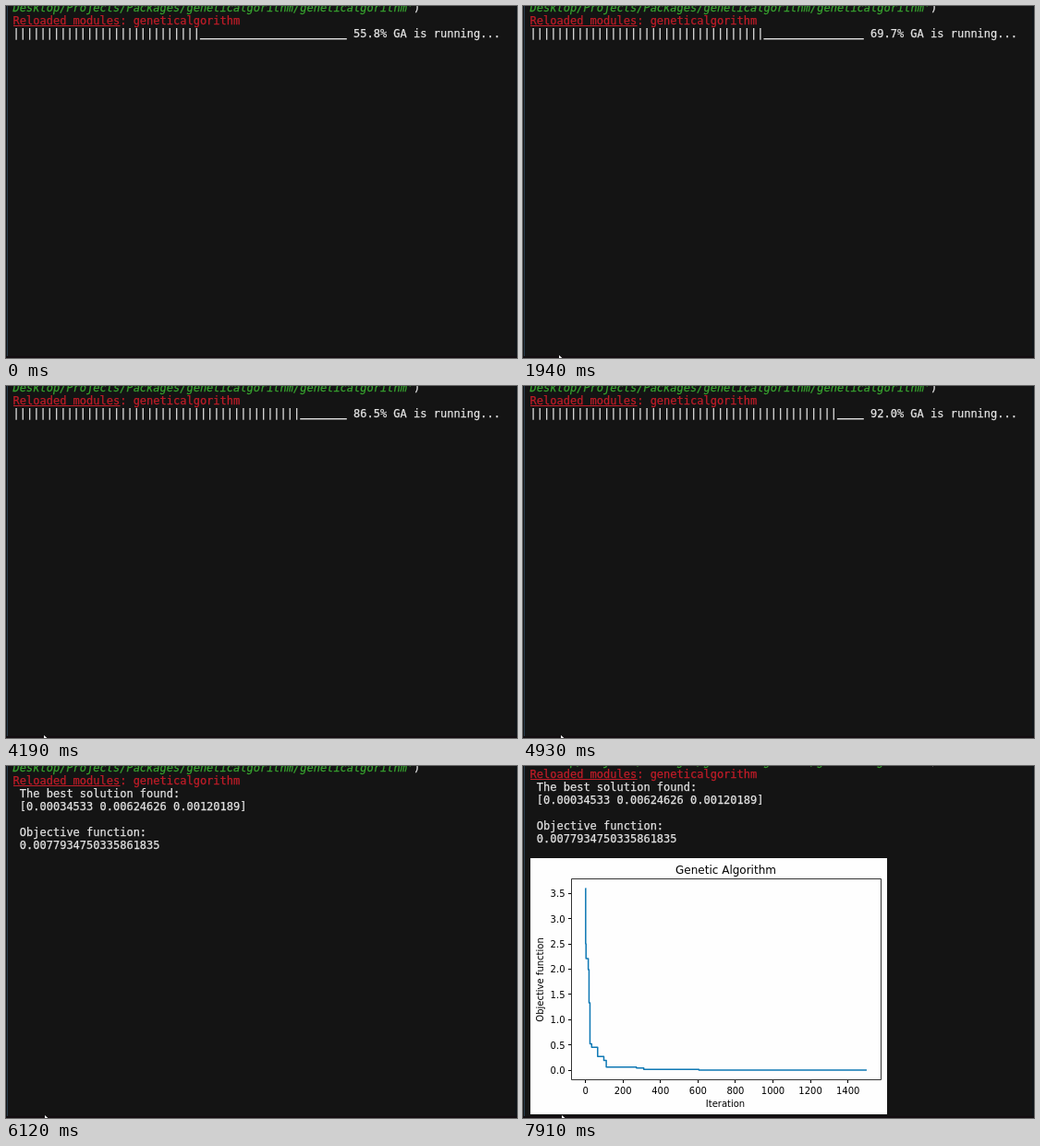
An HTML page with a canvas that plays this animation: 553 by 382 pixels, repeating every 8000 ms.

```html
<!DOCTYPE html>
<html lang="en">
<head>
<meta charset="utf-8">
<title>Genetic algorithm run</title>
<style>
html, body { margin: 0; width: 100%; height: 100%; overflow: hidden; background: #141414; }
canvas { display: block; width: 553px; height: 382px; }
</style>
</head>
<body>
<canvas id="stage" width="553" height="382"></canvas>
<script>
const ctx = document.getElementById('stage').getContext('2d');
const W = 553, H = 382, LOOP = 8000, STEP = 148.7;
const MONO = '12px "DejaVu Sans Mono", monospace';
const SANS = '"DejaVu Sans", sans-serif';
const WHITE = '#e2e2e2', RED = '#c01c28', GREEN = '#37a32f', INK = '#000';
const LEFT = 7.6, LINE = 14, CHAR = 7.224;
const DONE = 6120, PLOT = 6270;

// Percent done at a few refresh counts.
const PROGRESS = [[0, 55.8], [13, 69.7], [28, 86.5], [40, 99.7]];

// Best objective value from each iteration on.
const BEST = [[0, 3.6], [1, 2.5], [3, 2.21], [15, 1.99], [19, 1.33], [24, 0.52], [33, 0.45],
              [65, 0.27], [98, 0.19], [111, 0.06], [272, 0.04], [311, 0.015], [605, 0]];

function progressAt(n) {
  const i = Math.max(1, PROGRESS.findIndex(p => p[0] >= n));
  const [n0, p0] = PROGRESS[i - 1], [n1, p1] = PROGRESS[i];
  return p0 + (p1 - p0) * (n - n0) / (n1 - n0);
}

function rect(x, y, w, h, color) {
  ctx.fillStyle = color;
  ctx.fillRect(x, y, w, h);
}

function text(str, x, y, font, align = 'center', color = INK) {
  ctx.font = font;
  ctx.textAlign = align;
  ctx.fillStyle = color;
  ctx.fillText(str, x, y);
}

// Console text, slightly emboldened.
function mono(str, col, y, color = WHITE, style = '') {
  const x = LEFT + col * CHAR;
  text(str, x, y, style + MONO, 'left', color);
  ctx.strokeStyle = color;
  ctx.lineWidth = 0.25;
  ctx.strokeText(str, x, y);
}

function drawWindow() {
  rect(0, 0, W, H, '#141414');
  rect(551, 0, 2, H, '#0e1317');
  rect(0, 380, W, 2, '#130d10');
  rect(1, 0, 1, 380, '#293d4c');
}

function drawHeader(y) {
  const path = "Desktop/Projects/Packages/geneticalgorithm/geneticalgorithm'";
  mono(path, 0, y, GREEN, 'italic ');
  mono(')', path.length, y);
  mono('Reloaded modules: geneticalgorithm', 0, y + LINE, RED);
  rect(8, y + LINE + 1, 16 * CHAR, 1, RED);
}

function drawBar(percent, y) {
  const full = Math.round(percent / 2);
  mono('|'.repeat(full), 0, y);
  rect(LEFT + full * CHAR, y + 1, (50 - full) * CHAR, 1.4, WHITE);
  mono(`${percent.toFixed(1)}% GA is running...`, 51, y);
}

function drawResult(y) {
  ['The best solution found:', '[0.00034533 0.00624626 0.00120189]', '',
   'Objective function:', '0.0077934750335861835'
  ].forEach((s, i) => mono(s, 1, y + i * LINE));
}

const plotX = iteration => 67.6 + iteration * 0.2029;
const plotY = value => 330 - value * 54.8;

function drawPlot() {
  const small = '10px ' + SANS;
  rect(8, 100, 386, 278, '#fefefe');
  text('Genetic Algorithm', 219.5, 117, '12px ' + SANS);
  text('Iteration', 219, 370, small);
  ctx.save();
  ctx.translate(22, 232);
  ctx.rotate(-Math.PI / 2);
  text('Objective function', 0, 0, small);
  ctx.restore();

  for (let i = 0; i <= 7; i++) {
    const x = plotX(i * 200), y = plotY(i / 2);
    rect(Math.floor(x), 341, 1, 3, INK);
    text(i * 200, x, 356, small);
    rect(49, Math.floor(y), 3, 1, INK);
    text((i / 2).toFixed(1), 45.5, Math.round(y) + 4, small, 'right');
  }

  ctx.beginPath();
  let last = BEST[0][1];
  for (const [iteration, value] of BEST) {
    ctx.lineTo(plotX(iteration), plotY(last));
    ctx.lineTo(plotX(iteration), plotY(value));
    last = value;
  }
  ctx.lineTo(plotX(1500), plotY(last));
  ctx.strokeStyle = '#0e78b4';
  ctx.lineWidth = 1.5;
  ctx.lineJoin = 'round';
  ctx.stroke();

  ctx.strokeStyle = INK;
  ctx.lineWidth = 0.8;
  ctx.strokeRect(52.5, 122.5, 335, 218);
}

// The pointer tip creeps right along the bottom edge, then twitches twice.
function drawPointer(t) {
  if (t < 750) return;
  const twitch = (t >= 7170 && t < 7320) || (t >= 7610 && t < 7910);
  const x = Math.min(42, Math.floor(38 + t / 1250)) - (twitch ? 2 : 0);
  ctx.beginPath();
  ctx.moveTo(x, 379);
  ctx.lineTo(x + 3.4, 382);
  ctx.lineTo(x, 382);
  ctx.fillStyle = '#fff';
  ctx.fill();
}

function draw(t) {
  const scroll = t >= PLOT ? 7 : 0;
  drawWindow();
  drawHeader(6 - scroll);
  if (t < DONE) drawBar(progressAt(Math.min(40, Math.floor(t / STEP))), 34);
  else drawResult(34 - scroll);
  if (t >= PLOT) drawPlot();
  drawPointer(t);
}

const start = performance.now();
function tick() {
  draw((performance.now() - start) % LOOP);
  requestAnimationFrame(tick);
}
tick();
</script>
</body>
</html>
```
